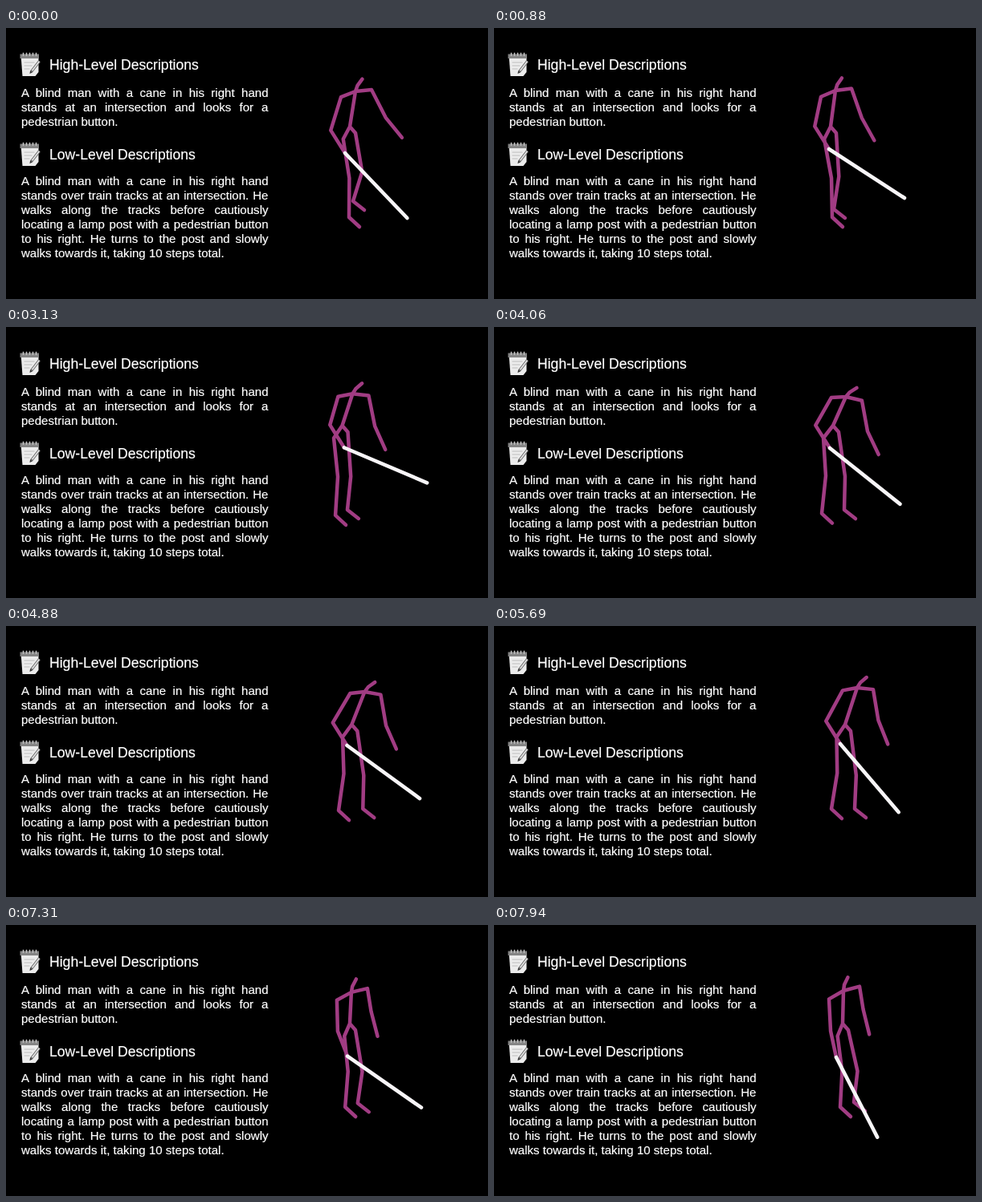
These frames come from a looping animation (600 px wide and 338 px high, 8 s). An HTML page:

```html
<!DOCTYPE html>
<html lang="en">
<head>
<meta charset="utf-8">
<title>Walking with a cane</title>
<style>
  html, body { margin: 0; width: 100%; height: 100%; overflow: hidden; background: #000; }
  body { position: relative; color: #fff; font-family: "Liberation Sans", Arial, sans-serif; -webkit-text-stroke: .2px #fff; }
  svg { position: absolute; left: 0; top: 0; }
  h2, p { position: absolute; margin: 0; }
  h2 { left: 54px; font-size: 17.6px; line-height: 20px; font-weight: 400; white-space: nowrap; }
  p { left: 19px; width: 307.5px; font-size: 15.05px; line-height: 18.1px; text-align: justify; }
</style>
</head>
<body>
<h2 style="top:36px">High-Level Descriptions</h2>
<p style="top:72px">A blind man with a cane in his right hand stands at an intersection and looks for a pedestrian button.</p>
<h2 style="top:148px">Low-Level Descriptions</h2>
<p style="top:181.6px">A blind man with a cane in his right hand stands over train tracks at an intersection. He walks along the tracks before cautiously locating a lamp post with a pedestrian button to his right. He turns to the post and slowly walks towards it, taking 10 steps total.</p>
<svg width="600" height="338" viewBox="0 0 600 338">
  <defs>
    <g id="note">
      <path d="M1 3h22v22l-4 5H3z" fill="#ececec"/>
      <path d="M0 2.5h23.5v5.5H0z" fill="#858585"/>
      <path d="M4 .8v4M8 .8v4M12 .8v4M16 .8v4M20 .8v4" stroke="#ccc" stroke-width="1.4"/>
      <path d="M5 13h13M5 17h10M5 21h7" stroke="#bdbdbd"/>
      <path d="M24 11.5 14 24.5" stroke="#666" stroke-width="3.6"/>
      <path d="M24 11.5 15 23.2" stroke="#e4e4e4" stroke-width="1.8"/>
      <path d="M12.6 23.2 15.4 25.4 12 27z" fill="#333"/>
    </g>
  </defs>
  <use href="#note" x="17.5" y="30"/>
  <use href="#note" x="17.5" y="142"/>
  <path id="body" fill="none" stroke="#a13c83" stroke-width="4.5" stroke-linecap="round" stroke-linejoin="round"/>
  <path id="cane" fill="none" stroke="#f7f5f7" stroke-width="4.6" stroke-linecap="round"/>
</svg>
<script>
const LOOP = 8000, STEP = 62.5, FRAMES = LOOP / STEP;
const HIP_Y = 123, CANE = 112;
const poses = [0, 14, 35, 65, 91, 106, 127];

const segment = (times, f) => {
  let i = 0;
  while (i < times.length - 2 && f >= times[i + 1]) i++;
  return i;
};

// Smooth curve through key values that never overshoots them.
const curve = (values, times = poses) => f => {
  const i = segment(times, f), h = times[i + 1] - times[i], u = (f - times[i]) / h, v = 1 - u;
  const slope = k => (values[k + 1] - values[k]) / (times[k + 1] - times[k]) || 0;
  const tangent = k => {
    const p = slope(k - 1), q = slope(k);
    return p * q > 0 ? 2 * p * q / (p + q) : 0;
  };
  return values[i] * v * v * (1 + 2 * u) + values[i + 1] * u * u * (3 - 2 * u)
    + h * u * v * (tangent(i) * v - tangent(i + 1) * u);
};

// The few driven joints; the rest of the body follows from them.
const pelvisX = curve([428, 419, 417, 422, 437, 421, 434]);
const neckX = curve([435, 425, 427, 438, 452, 424, 435]);
const neckY = curve([79, 78, 79, 87, 77, 86, 82]);
const handX = curve([422, 417, 424, 418, 431, 424, 426]);
const handY = curve([156, 151, 150, 151, 147, 160, 165]);
const nearX = curve([427, 421, 414, 408, 420, 412, 431]);
const farX = curve([432, 423, 418, 436, 449, 426, 448]);
const sweep = curve([43.7, 57, 62, 54, 67, 51.4, 54, 40.5, 45, 62, 27.2],
  [0, 14, 22, 35, 50, 65, 80, 91, 106, 113, 127]);

const ease = (f, from, to) => {
  const u = Math.min(1, Math.max(0, (f - from) / (to - from)));
  return u * u * (3 - 2 * u);
};
const bump = u => u > 0 && u < 1 ? Math.sin(Math.PI * u) ** 2 : 0;
const move = ([x, y], dx, dy) => [x + dx, y + dy];
// Angles count from straight down, towards the right.
const reach = (p, length, deg) => {
  const a = deg * Math.PI / 180;
  return move(p, length * Math.sin(a), length * Math.cos(a));
};
const line = points => 'M' + points.map(p => p.map(v => v.toFixed(2)).join(' ')).join('L');

function leg(pelvis, hip, ankle, along, bend, foot) {
  const knee = [hip[0] + (ankle[0] - hip[0]) * along + bend, hip[1] + (ankle[1] - hip[1]) * along];
  return [pelvis, hip, knee, ankle, move(ankle, ...foot)];
}

function draw(f) {
  const pelvis = [pelvisX(f), HIP_Y], neck = [neckX(f), neckY(f)], hand = [handX(f), handY(f)];
  const lean = Math.atan2(neck[0] - pelvis[0], pelvis[1] - neck[1]) * 180 / Math.PI;

  const nod = 164 - 1.45 * lean;
  const head = [neck, reach(neck, 7.5, nod + 10), reach(neck, 17.5, nod)];

  const caneArm = [neck, move(neck, -18, 11 - 0.42 * lean),
    reach(hand, -33.5, 32 - 20 * ease(f, 106, 127)), hand];

  const relax = Math.exp(-f / 25), shoulder = move(neck, 20, 0.45 * lean - 6);
  const elbow = reach(shoulder, 39 - 10 * ease(f, 91, 106), 9 + 18 * relax);
  const freeArm = [neck, shoulder, elbow, reach(elbow, 32, 13 + 22 * relax + 0.45 * lean)];

  // One step of each foot between two poses.
  const i = segment(poses, f), u = (f - poses[i]) / (poses[i + 1] - poses[i]);
  const nearLift = 7 * bump(2 * u);
  const farLift = 12 * Math.exp(-f / 8) + 7 * ease(f, 91, 127) + 7 * bump(2 * u - 1);
  const nearLeg = leg(pelvis, move(pelvis, -6 - 0.25 * lean, 15.5),
    [nearX(f), 236 - 9 * ease(f, 35, 106) - nearLift], 0.5, 4 + nearLift / 2, [13, 12]);
  const farLeg = leg(pelvis, move(pelvis, 7, 8),
    [farX(f), 228 - farLift], 0.57, 4 + farLift / 2, [14, 11]);

  document.getElementById('body').setAttribute('d',
    [farLeg, nearLeg, [pelvis, neck], head, caneArm, freeArm].map(line).join(''));
  document.getElementById('cane').setAttribute('d', line([hand, reach(hand, CANE, sweep(f))]));
}

const start = performance.now();
function tick() {
  const t = (performance.now() - start) % LOOP;
  draw(Math.min(FRAMES - 1, Math.floor((t + 5) / STEP)));
  requestAnimationFrame(tick);
}
tick();
</script>
</body>
</html>
```
